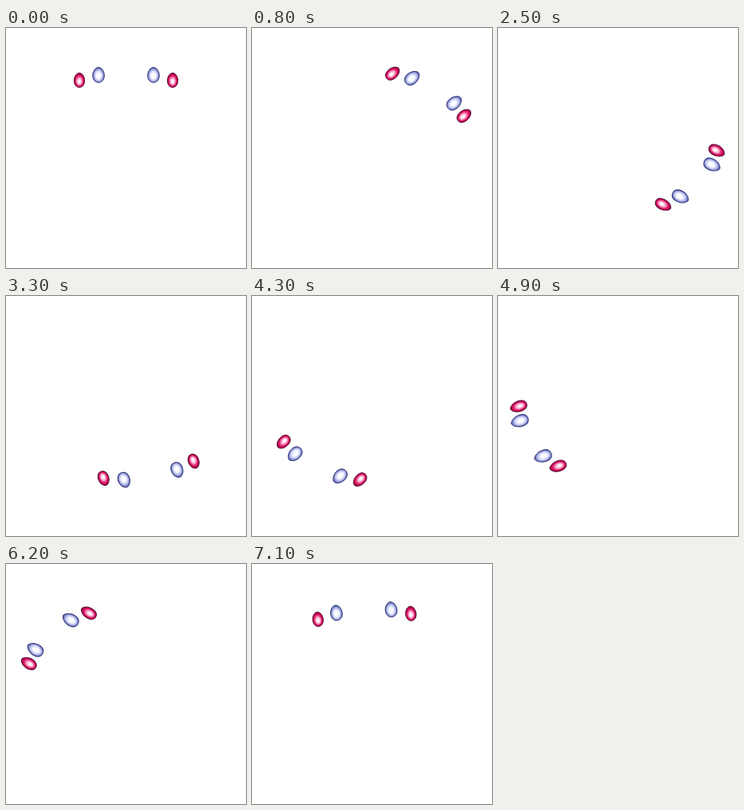
Write an HTML page that moves like this. It is 301 px wide and 301 px high and loops after 7.2 s.

```html
<!DOCTYPE html>
<html lang="en">
<head>
<meta charset="utf-8">
<title>Orbiting eggs</title>
<style>
html, body { margin: 0; width: 100%; height: 100%; overflow: hidden; background: #fff; }
svg { display: block; width: 100vw; height: 100vh; }
</style>
</head>
<body>
<svg viewBox="0 0 301 301">
  <defs>
    <radialGradient id="blue" cx=".48" cy=".5" r=".53" fx=".42" fy=".5">
      <stop offset="0" stop-color="#fff"/>
      <stop offset=".34" stop-color="#fbfbff"/>
      <stop offset=".62" stop-color="#c6caf2"/>
      <stop offset=".82" stop-color="#8088cc"/>
      <stop offset="1" stop-color="#343a86"/>
    </radialGradient>
    <radialGradient id="red" cx=".48" cy=".5" r=".53" fx=".38" fy=".5">
      <stop offset="0" stop-color="#fff"/>
      <stop offset=".2" stop-color="#fff0f6"/>
      <stop offset=".45" stop-color="#f59abf"/>
      <stop offset=".67" stop-color="#e01d6c"/>
      <stop offset=".85" stop-color="#c00050"/>
      <stop offset="1" stop-color="#5c0028"/>
    </radialGradient>
  </defs>
  <g id="stage" stroke-width=".9"></g>
</svg>
<script>
const CX = 150.5, CY = 143, R = 125, TILT = Math.SQRT1_2;
const STEP = 100, STEPS = 72, RAD = Math.PI / 180;

// len and wid are half axes, taper sharpens the outer end
const BLUE = { fill: 'blue', edge: '#2b3070', len: 11.3, wid: 7.3, taper: 2.2 };
const RED = { fill: 'red', edge: '#4c0a2c', len: 11, wid: 6.6, taper: 1.5 };

const stage = document.getElementById('stage');
const eggs = [[RED, -27.9], [BLUE, -16], [BLUE, 16], [RED, 27.9]].map(([kind, offset]) => {
  const path = document.createElementNS('http://www.w3.org/2000/svg', 'path');
  path.setAttribute('fill', `url(#${kind.fill})`);
  path.setAttribute('stroke', kind.edge);
  stage.append(path);
  return { kind, offset: offset * RAD, path };
});

// Silhouette of a solid egg whose axis is foreshortened by p,
// built from its support function h and the derivative dh
function outline({ len, wid, taper }, p) {
  const points = [];
  for (let i = 0; i < 48; i++) {
    const a = i / 48 * 2 * Math.PI, cos = Math.cos(a), sin = Math.sin(a);
    const c = p * cos, dc = -p * sin, k = len * len - wid * wid;
    const root = Math.sqrt(wid * wid + k * c * c);
    const h = root + taper * (c ** 3 - c);
    const dh = (k * c / root + taper * (3 * c * c - 1)) * dc;
    points.push((h * cos - dh * sin).toFixed(2) + ' ' + (h * sin + dh * cos).toFixed(2));
  }
  return 'M' + points.join('L') + 'Z';
}

function draw(ms) {
  const turn = Math.floor(ms / STEP) % STEPS / STEPS * 2 * Math.PI;
  const ux = Math.sin(turn), uy = -Math.cos(turn) * TILT;
  const angle = Math.atan2(uy, ux) / RAD, p = Math.hypot(ux, uy);
  for (const { kind, offset, path } of eggs) {
    const x = CX + R * Math.sin(turn + offset);
    const y = CY - R * TILT * Math.cos(turn + offset);
    path.setAttribute('d', outline(kind, p));
    path.setAttribute('transform', `translate(${x} ${y}) rotate(${angle})`);
  }
}

let start;
function tick(now) {
  start ??= now;
  draw(Math.max(0, now - start));
  requestAnimationFrame(tick);
}
draw(0);
requestAnimationFrame(tick);
</script>
</body>
</html>
```
